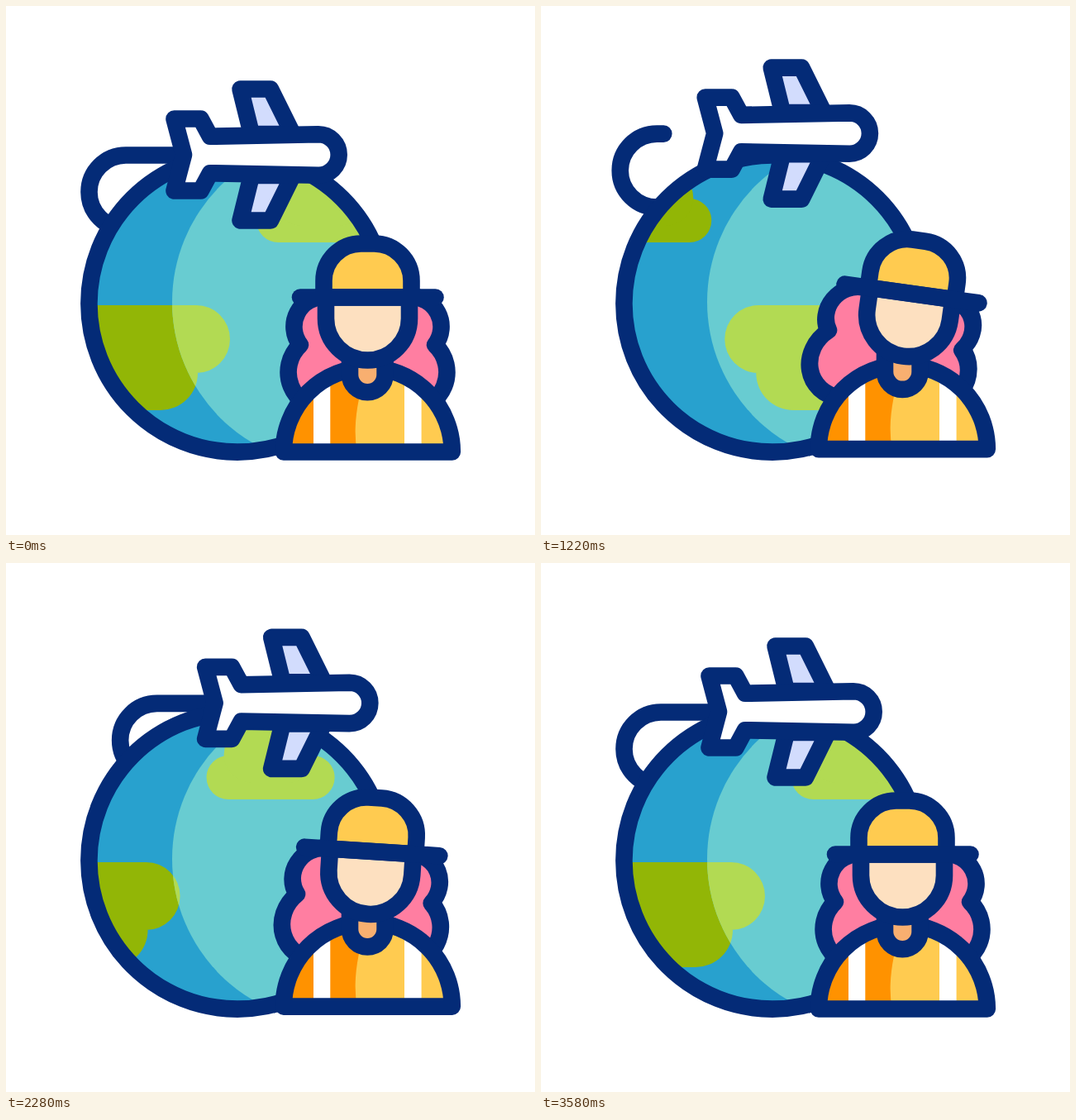
Recreate the animation shown at these times as an HTML page. Size 640 by 640 pixels, loop 3600 ms.

```html
<!DOCTYPE html>
<html lang="en">
<head>
<meta charset="utf-8">
<title>Travel guide</title>
<style>
  html, body { margin: 0; width: 100%; height: 100%; overflow: hidden; background: #fff; }
  svg { display: block; width: 100vw; height: 100vh; }
  .line { fill: none; stroke: #042b77; stroke-width: 20.6; stroke-linecap: round; stroke-linejoin: round; }
  .white { fill: #fff; }
  .lavender { fill: #d2dcfd; }
  .pink { fill: #ff7ea1; }
  .yellow { fill: #ffcb50; }
  .skin { fill: #fde0c0; }
  .shade { fill: #f8af70; }
</style>
</head>
<body>
<svg viewBox="0 0 640 640">
  <defs>
    <clipPath id="globe"><circle cx="280" cy="360" r="178"/></clipPath>
    <clipPath id="lit"><circle cx="399.2" cy="358" r="198.2"/></clipPath>
    <path id="dome" d="M335.8 539.5A102 102 0 0 1 539.8 539.5Z"/>
    <clipPath id="torso"><use href="#dome"/></clipPath>
    <g id="land">
      <path d="M75 362H230A41 41 0 0 1 230 444H232A45 45 0 0 1 187 489H117A45 45 0 0 1 72 444H75A41 41 0 0 1 75 362Z"/>
      <rect x="303" y="233" width="155" height="53" rx="26.5"/>
      <rect x="324" y="198" width="112" height="68" rx="34"/>
    </g>
    <g id="lands">
      <use href="#land"/>
      <use href="#land" x="-440"/>
    </g>
  </defs>

  <g class="plane">
    <path id="trail" class="line" d="M145 269.5A44.5 44.5 0 0 1 145 180.5H215.2"/>
  </g>

  <g clip-path="url(#globe)">
    <rect x="90" y="170" width="380" height="380" fill="#28a1ce"/>
    <use href="#lands" class="lands" fill="#92b606"/>
    <g clip-path="url(#lit)">
      <rect x="90" y="170" width="380" height="380" fill="#68ccd1"/>
      <use href="#lands" class="lands" fill="#b2da53"/>
    </g>
  </g>
  <circle class="line" cx="280" cy="360" r="179.6"/>

  <g class="plane">
    <path class="line lavender" d="M297 155L283.5 100.5H320L347 155Z"/>
    <path class="line lavender" d="M297 205L283.5 259.5H320L347 205Z"/>
    <path class="line white" d="M378 155.3L247 157.8 235.5 136.5H203.5L215 180 203.5 223.5H235.5L247 202.2 378 204.7A24.7 24.7 0 0 0 378 155.3Z"/>
  </g>

  <g id="hair">
    <path class="line pink" d="M437.5 352H488.5A36 36 0 0 1 519 410A45 45 0 0 1 487.5 488H387.5A45 45 0 0 1 356 410A36 36 0 0 1 386.5 352Z"/>
  </g>

  <g id="body">
    <g clip-path="url(#torso)">
      <rect class="yellow" x="335" y="430" width="206" height="112"/>
      <path fill="#ff9200" d="M335 430H440Q415 500 426 545H335Z"/>
      <path class="white" d="M372 430h20.3v112h-20.3ZM482 430h20.6v112h-20.6Z"/>
    </g>
    <use href="#dome" class="line"/>
    <path class="line shade" d="M416 405V446A21.3 21.3 0 0 0 458.6 446V405"/>
  </g>

  <g id="head">
    <path class="line skin" d="M387 320V378A50.5 50.5 0 0 0 488 378V320Z"/>
    <path class="line pink" d="M387 320V338Q412 362 437.5 333 463 362 488 338V320Z"/>
  </g>
  <g id="hat">
    <path class="line yellow" d="M384.5 352.5V332.5A45 45 0 0 1 429.5 287.5H445.5A45 45 0 0 1 490.5 332.5V352.5Z"/>
    <path class="line" d="M356 352.5H519.5"/>
  </g>
</svg>
<script>
const LOOP = 3600, JUMP = 1080, TRAIL = 210, WORLD = 440;
const all = s => [...document.querySelectorAll(s)];
const clamp = u => Math.min(1, Math.max(0, u));
const arch = u => Math.sin(Math.PI * clamp(u));

// Same as cubic-bezier(x1, 0, x2, 1).
const bezier = (x1, x2) => u => {
  let lo = 0, hi = 1, s;
  for (let i = 0; i < 24; i++) {
    s = (lo + hi) / 2;
    const x = 3 * s * (1 - s) * ((1 - s) * x1 + s * x2) + s ** 3;
    if (x < u) lo = s; else hi = s;
  }
  return s * s * (3 - 2 * s);
};
const swing = bezier(.37, .63), turn = bezier(.322, .345), chase = bezier(.427, .896);

// Eases from one [time, value] pair to the next.
const track = (...keys) => t => keys.reduce((value, [end, to], i) => {
  const start = i ? keys[i - 1][0] : 0;
  return value + (to - value) * swing(clamp((t - start) / (end - start)));
}, 0);

const planeX = track([600, -25.5], [2200, 38], [3500, 0]);
const planeY = track([600, 25.5], [1200, -26], [1800, 12.8], [2400, -13], [3000, 0]);
const tilt = track([100, 0], [720, -9.1], [1200, 8], [1800, -6.2], [2400, 4.7], [3000, -3], [3600, 0]);

const planes = all('.plane'), lands = all('.lands');
const [trail, hair, body, head, hat] = all('#trail, #hair, #body, #head, #hat');
const place = (el, value) => el.setAttribute('transform', value);
trail.setAttribute('stroke-dasharray', `${TRAIL} ${TRAIL}`);

function draw(t) {
  planes.forEach(el => place(el, `translate(${planeX(t)} ${planeY(t)})`));
  lands.forEach(el => place(el, `translate(${WORLD * turn(t / LOOP)} 0)`));
  trail.setAttribute('stroke-dashoffset', -4 * TRAIL * chase(clamp(t / (2 * JUMP))));

  // Three hops, then a rest; the head and the hat leave the body a little late.
  const hop = Math.floor(t / JUMP);
  const phase = hop < 3 ? t % JUMP : 0;
  const late = arch((phase - 100) / (JUMP - 100));
  const rise = 13 * (1 - Math.abs(2 * phase / JUMP - 1));
  const up = rise + 11.5 * late;
  const lift = (31 - 9 * hop) * late ** 2;
  const angle = tilt(t);
  const lean = `rotate(${angle} 437.5 430)`;

  place(body, `translate(0 ${-rise})`);
  place(head, `translate(0 ${-up}) ${lean}`);
  place(hat, `translate(0 ${-up - lift}) ${lean}`);
  place(hair, `translate(437.5 ${371 - up}) rotate(${angle}) skewX(${-.65 * angle}) translate(-437.5 -371)`);
}

function tick() {
  draw(performance.now() % LOOP);
  requestAnimationFrame(tick);
}
tick();
</script>
</body>
</html>
```
